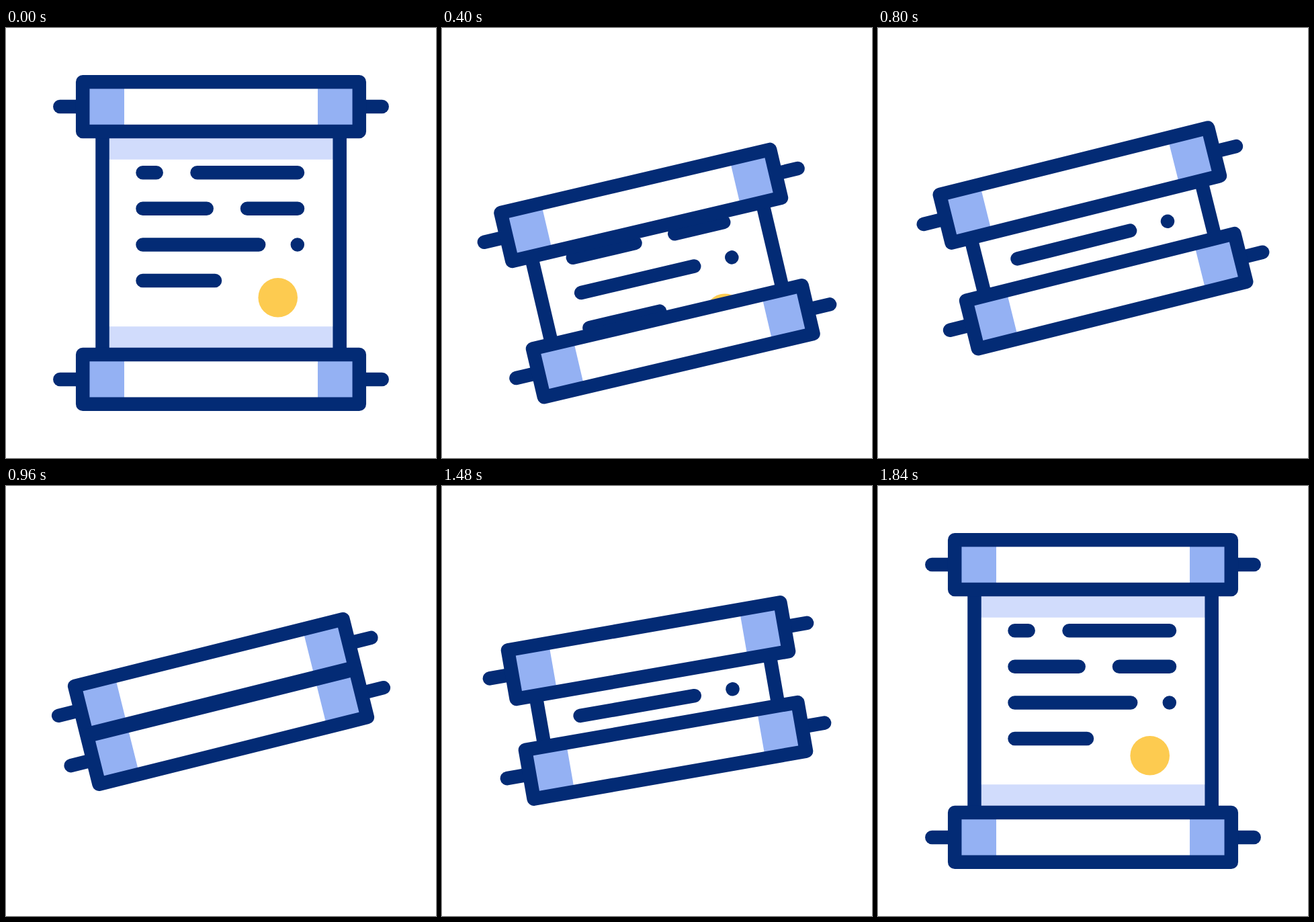
Recreate the animation shown at these times as an HTML page. Size 640 by 640 pixels, loop 2000 ms.

```html
<!DOCTYPE html>
<html lang="en">
<head>
<meta charset="utf-8">
<title>Scroll</title>
<style>
  html, body { margin: 0; width: 100%; height: 100%; overflow: hidden; background: #fff; }
  svg { display: block; width: 100%; height: 100%; }
  .ink { fill: none; stroke: #032b75; stroke-width: 20.5; stroke-linecap: round; stroke-linejoin: round; }
</style>
</head>
<body>
<svg viewBox="0 0 640 640">
  <defs>
    <clipPath id="between"><rect id="window" x="-200" width="400"/></clipPath>
    <g id="roller">
      <path class="ink" d="M-239.7 0H239.7"/>
      <path fill="#fff" d="M-205.8-36.9H205.8V36.9H-205.8Z"/>
      <path fill="#94b1f3" d="M-205-30H-144V30H-205ZM144-30H205V30H144Z"/>
      <path class="ink" d="M-205.8-36.9H205.8V36.9H-205.8Z"/>
    </g>
  </defs>
  <g id="scroll">
    <g clip-path="url(#between)">
      <path fill="#fff" d="M-176-203H176V203H-176Z"/>
      <path fill="#d1dcfc" d="M-176-203H176V-124.3H-176ZM-176 124.2H176V203H-176Z"/>
      <path class="ink" d="M-176.5-203V203M176.7-203V203"/>
      <path class="ink" d="M-116.5-104.8h20.2M-35.5-104.8H114M-116.5-51.3h95.2M39-51.3h75
        M-116.5 2.4H56.2M113.8 2.4h.01M-116.5 56H-9"/>
      <circle cx="84.7" cy="81.2" r="29.3" fill="#fdcb50"/>
    </g>
    <use id="top" href="#roller"/>
    <use id="bottom" href="#roller"/>
  </g>
</svg>
<script>
  const LOOP = 2000, STEP = 40;
  const byId = id => document.getElementById(id);

  // Tracks of [time in ms, value], eased in and out between keys.
  const tilt = [[160, 0], [440, -14], [1280, -14], [1840, 0]];
  const gap = [[160, 202.9], [422, 101.9], [720, 101.9], [930, 38.3], [1320, 38.3], [1840, 202.9]];
  const lift = [[160, 0], [440, 47.7], [680, -22], [880, 1], [1320, 1], [1480, -0.5], [1840, 0]];

  function valueAt(track, time) {
    const next = track.findIndex(([keyTime]) => keyTime > time);
    if (next === 0) return track[0][1];
    if (next < 0) return track[track.length - 1][1];
    const [t0, v0] = track[next - 1], [t1, v1] = track[next];
    const s = (time - t0) / (t1 - t0);
    return v0 + (v1 - v0) * s * s * (3 - 2 * s);
  }

  function draw(now) {
    const time = Math.floor((now % LOOP) / STEP) * STEP;
    const half = valueAt(gap, time);
    byId('scroll').setAttribute('transform',
      `translate(320 ${320 + valueAt(lift, time)}) rotate(${valueAt(tilt, time)})`);
    byId('top').setAttribute('y', -half);
    byId('bottom').setAttribute('y', half);
    byId('window').setAttribute('y', -half);
    byId('window').setAttribute('height', 2 * half);
  }

  const start = performance.now();
  function tick() {
    draw(performance.now() - start);
    requestAnimationFrame(tick);
  }
  tick();
</script>
</body>
</html>
```
